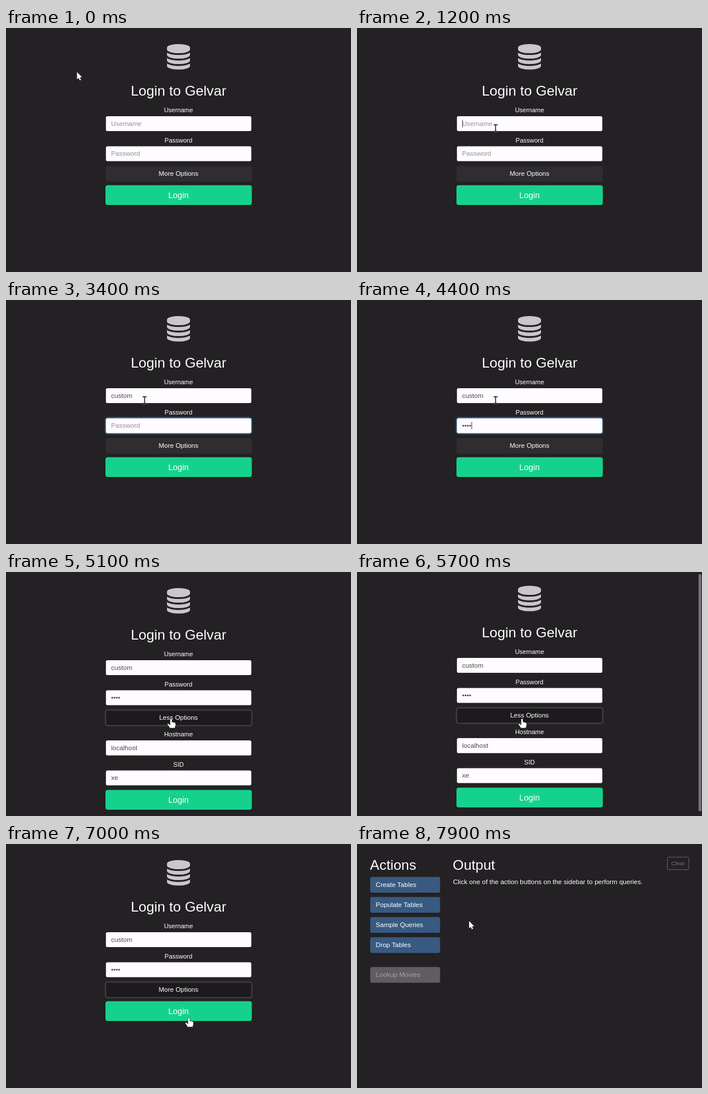
Animation, 600 px wide and 426 px high, one loop 8000 ms. Source, as an HTML page:

```html
<!DOCTYPE html>
<html lang="en">
<head>
<meta charset="utf-8">
<title>Login</title>
<style>
html, body { margin: 0; width: 100%; height: 100%; overflow: hidden; background: #232123; }
svg { display: block; width: 600px; height: 426px; }
text { font: 11.5px "Liberation Sans", Arial, sans-serif; fill: #fff; white-space: pre; }
.mid { text-anchor: middle; }
.h { font-size: 24.5px; }
.label { font-size: 11px; }
.big { font-size: 14.6px; }
.small { font-size: 9.9px; fill: #757375; }
.value { fill: #4b494c; }
.hint { fill: #939195; }
.box { fill: #fefcff; }
.off { fill: #a5a3a5; }
.ring { fill: none; stroke: #4d7fa8; }
.glow { fill: none; stroke: #24425e; stroke-width: 3; opacity: .7; }
</style>
</head>
<body>
<svg viewBox="0 0 600 426">
  <defs>
    <clipPath id="fold"><rect id="foldBox" x="160" y="273" width="280" height="0"/></clipPath>
    <path id="band" d="M280 42.9c7.5 5.6 32.5 5.6 40 0v4.2a20 6.4 0 0 1-40 0z"/>
  </defs>
  <g id="login">
    <g fill="#c9c7c9">
      <path d="M280 34.4a20 6.4 0 0 1 40 0v3.2a20 6.4 0 0 1-40 0z"/>
      <use href="#band"/><use href="#band" y="9.56"/><use href="#band" y="19.12"/>
    </g>
    <text class="mid h" x="300" y="117.7">Login to Gelvar</text>
    <g id="fields"></g>
    <rect id="more" x="173" y="241" width="254.5" height="27.3" rx="4"/>
    <text id="moreText" class="mid" x="300" y="258.4"></text>
    <g id="extra" clip-path="url(#fold)"></g>
    <g id="submit">
      <rect x="173" y="274.5" width="254.5" height="34.5" rx="4" fill="#14d28d"/>
      <text class="mid big" x="300" y="297.2">Login</text>
    </g>
  </g>
  <rect id="thumb" x="594" width="5" height="414.5" rx="2.5" fill="#737173"/>
  <g id="home">
    <text class="h" x="22.6" y="45.3">Actions</text>
    <text class="h" x="166.6" y="45.3">Output</text>
    <text x="167" y="70">Click one of the action buttons on the sidebar to perform queries.</text>
    <rect x="539.7" y="23" width="37.3" height="21.8" rx="2.5" fill="none" stroke="#656365"/>
    <text class="mid small" x="558.2" y="37.4">Clear</text>
    <g id="actions"></g>
  </g>
  <g id="cursor">
    <path id="arrow" fill="#fff" d="M0 0V12.6L2.9 9.9 4.8 14.4 6.9 13.5 5 9.1H8.8z"/>
    <g id="beam" fill="none">
      <path stroke="#fff" stroke-width="2.4" opacity=".6" d="M-3.5-5.7H3.5M0-5.7V5.7M-3.5 5.7H3.5"/>
      <path stroke="#111" stroke-width="1.4" d="M-3.5-5.7H3.5M0-5.7V5.7M-3.5 5.7H3.5"/>
    </g>
    <path id="hand" fill="#fff" stroke="#222" stroke-width=".6" d="M-1.7 1.6a1.7 1.7 0 0 1 3.4 0V6q1.3-.8 2.3.5 1.4-.8 2.2.6 1.8-.5 1.8 1.4v3q0 1.5-1 3v2H-2.6v-1.2L-6 10.6q-.8-1.6.6-1.9 1-.1 2 .9l1.7 1.6z"/>
  </g>
</svg>
<script>
const LOOP = 8000;
const $ = id => document.getElementById(id);
const clamp = v => Math.max(0, Math.min(1, v));
const ease = v => v * v * (3 - 2 * v);
const ramp = (t, from, to) => ease(clamp((t - from) / (to - from)));
const show = (el, on) => el.style.display = on ? '' : 'none';
const moveY = (el, y) => el.setAttribute('transform', `translate(0 ${y})`);

// Input with its label; y is the top edge of the white box
const field = (label, y, value, id = '') => `
  <text class="mid label" x="300" y="${y - 6.6}">${label}</text>
  <g ${id && `id="${id}Ring"`} opacity="0">
    <rect class="glow" x="172.5" y="${y - 1.3}" width="255" height="28.6" rx="4"/>
    <rect class="ring" x="173.3" y="${y - .5}" width="253.4" height="27" rx="3.5"/>
  </g>
  <rect class="box" x="173.8" y="${y}" width="252.8" height="26.2" rx="2.8"/>
  <text ${id && `id="${id}Text"`} class="value" x="182.7" y="${y + 17}">${value}</text>
  ${id && `<rect id="${id}Caret" y="${y + 6.5}" width="1" height="13" fill="#444"/>`}`;

$('fields').innerHTML = field('Username', 153.9, '', 'user') + field('Password', 206.4, '', 'pass');
$('extra').innerHTML = field('Hostname', 294, 'localhost') + field('SID', 346.4, 'xe');

const action = (name, y, off) => `
  <rect x="23" y="${y}" width="121.5" height="27.5" rx="3.2" fill="${off ? '#5f5d5f' : '#385a80'}"/>
  <text x="32.6" y="${y + 17.7}" ${off ? 'class="off"' : ''}>${name}</text>`;
$('actions').innerHTML = ['Create Tables', 'Populate Tables', 'Sample Queries', 'Drop Tables']
  .map((name, i) => action(name, 57.4 + i * 35.1)).join('') + action('Lookup Movies', 214.7, true);

const inputs = [
  { id: 'user', hint: 'Username', text: 'custom', focus: 1150, blur: 2850,
    keys: [1900, 2030, 2150, 2270, 2390, 2500] },
  { id: 'pass', hint: 'Password', text: '••••', focus: 2850, blur: 4750,
    keys: [3650, 3820, 3980, 4150] }
];

// Start and end time, then the point reached
const moves = [
  [0, 0, 123.5, 77], [100, 1000, 241, 174.7], [4400, 4720, 287, 256],
  [5720, 6020, 316, 258], [6480, 6850, 318, 303], [7380, 7880, 195, 134.6]
];
const OPEN = 4750, CLOSE = 6040, SUBMIT = 7100;

function pointer(t) {
  let [, , x, y] = moves[0];
  for (const [from, to, px, py] of moves.slice(1)) {
    const k = ramp(t, from, to);
    x += (px - x) * k;
    y += (py - y) * k;
  }
  return [x, y];
}

function drawInput(t, { id, hint, text, focus, blur, keys }) {
  const typed = keys.filter(k => t >= k);
  const label = $(id + 'Text'), caret = $(id + 'Caret');
  const value = text.slice(0, typed.length);
  label.textContent = value || hint;
  label.setAttribute('class', value ? 'value' : 'hint');
  const ring = ramp(t, focus + 80, focus + 260) * (1 - ramp(t, blur, blur + 150));
  $(id + 'Ring').setAttribute('opacity', ring);
  const last = typed.length ? typed[typed.length - 1] : focus;
  show(caret, t >= focus && t < blur && (t - last) % 1000 < 500);
  caret.setAttribute('x', 183 + (value ? label.getComputedTextLength() : 0));
}

function draw(t) {
  const home = t >= SUBMIT;
  show($('login'), !home);
  show($('home'), home);
  if (!home) inputs.forEach(input => drawInput(t, input));

  const open = ramp(t, OPEN, OPEN + 350) * (1 - ramp(t, CLOSE, CLOSE + 340));
  const shift = 106 * open;
  const scroll = Math.min(4 * ramp(t, 5230, 5400), Math.max(0, shift - 102));
  moveY($('login'), -scroll);
  moveY($('submit'), shift);
  $('foldBox').setAttribute('height', shift);
  $('thumb').setAttribute('y', scroll * .9);
  $('thumb').setAttribute('opacity', ramp(t, 5230, 5380) * (1 - ramp(t, 6450, 6850)));

  const pressed = t >= OPEN, more = $('more');
  more.setAttribute('fill', pressed ? '#1c1a1c' : '#2f2d30');
  more.setAttribute('stroke', pressed ? '#3d3b3d' : 'none');
  more.setAttribute('stroke-width', 2.6);
  $('moreText').textContent = t >= OPEN && t < CLOSE ? 'Less Options' : 'More Options';

  const [x, y] = pointer(t);
  const within = (top, bottom) => !home && x > 173 && x < 427 && y > top && y < bottom;
  const beam = within(154, 180) || within(206, 233);
  const hand = within(241, 268) || within(274, 309);
  show($('beam'), beam);
  show($('hand'), hand);
  show($('arrow'), !beam && !hand);
  $('cursor').setAttribute('transform', `translate(${x} ${y})`);
}

const start = performance.now();
function tick() {
  draw((performance.now() - start) % LOOP);
  requestAnimationFrame(tick);
}
tick();
</script>
</body>
</html>
```
